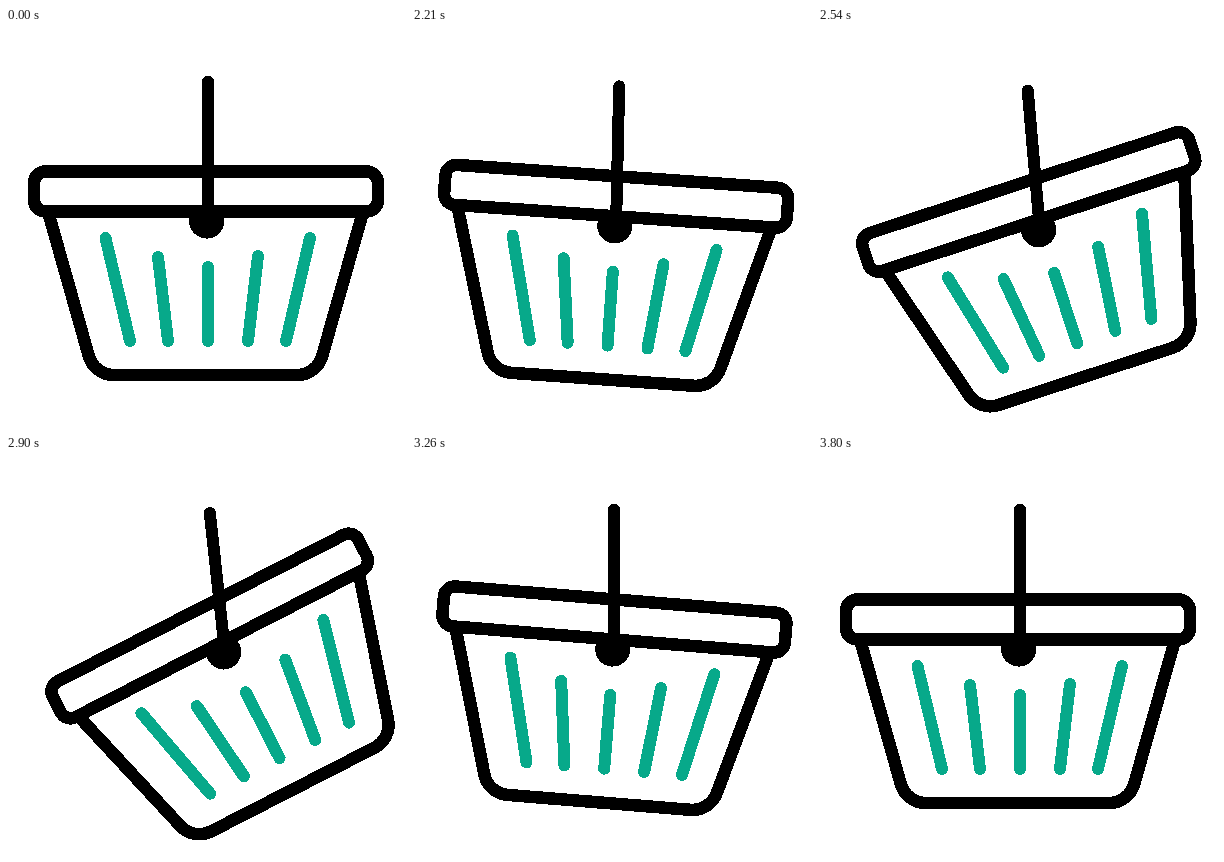
Animation, 400 px wide and 400 px high, one loop 3830 ms. Source, as an HTML page:

```html
<!DOCTYPE html>
<html lang="en">
<head>
<meta charset="utf-8">
<title>Swinging basket</title>
<style>
  html, body { margin: 0; width: 100%; height: 100%; overflow: hidden; background: #fff; }
  svg { display: block; width: 100%; height: 100%; shape-rendering: crispEdges; }
  .line { fill: none; stroke: #000; stroke-width: 12.5; stroke-linejoin: round; }
  .rods { fill: none; stroke: #07a98a; stroke-width: 12; stroke-linecap: round; }
</style>
</head>
<body>
<svg viewBox="0 0 400 400">
  <g id="hang">
    <g id="basket">
      <path class="line" d="M43 187 L82.8 328 A26 26 0 0 0 108 347 H291 A26 26 0 0 0 316.2 328 L356.2 187"/>
      <circle cx="200.7" cy="193" r="17.6"/>
      <rect class="line" style="fill:#fff" x="28.2" y="143.5" width="343.6" height="40" rx="11"/>
      <path class="rods" d="M99.5 210 L124 313 M152 229 L162 313 M202 239 V313 M252 228 L242 313 M304 210 L280 313"/>
    </g>
    <path d="M202 53.5 V190" fill="none" stroke="#000" stroke-width="12" stroke-linecap="round"/>
  </g>
</svg>
<script>
  const LOOP = 3830, REST = 2000, STEP = 30;
  const hang = document.getElementById('hang');
  const basket = document.getElementById('basket');

  const linear = p => p;
  const sine = p => (1 - Math.cos(Math.PI * p)) / 2;

  // Tracks: [ms after rest, value, easing towards this key]
  const shift = [[0, 0], [450, 10.4, linear], [1120, 0, linear]];
  const handleTurn = [[0, 0], [280, 1.7, linear], [680, -7.5, sine], [770, -7.5, linear], [1250, 0, sine]];
  const basketTurn = [[0, 0], [310, 6, linear], [690, -30.5, sine], [780, -30.5, linear], [1440, 12, sine], [1800, 0, sine]];

  function valueAt(track, t) {
    for (let i = 1; i < track.length; i++) {
      const [t0, v0] = track[i - 1];
      const [t1, v1, ease] = track[i];
      if (t <= t1) return v0 + (v1 - v0) * ease((t - t0) / (t1 - t0));
    }
    return track[track.length - 1][1];
  }

  function draw(now) {
    const t = Math.max(0, Math.floor((now % LOOP - REST) / STEP) * STEP);
    const d = valueAt(shift, t);
    const handle = valueAt(handleTurn, t);
    const tilt = valueAt(basketTurn, t) - handle;
    hang.setAttribute('transform', `translate(${d} ${d}) rotate(${handle} 202 68)`);
    basket.setAttribute('transform', `rotate(${tilt} 201 193)`);
  }

  const start = performance.now();
  function tick() {
    draw(performance.now() - start);
    requestAnimationFrame(tick);
  }
  tick();
</script>
</body>
</html>
```
